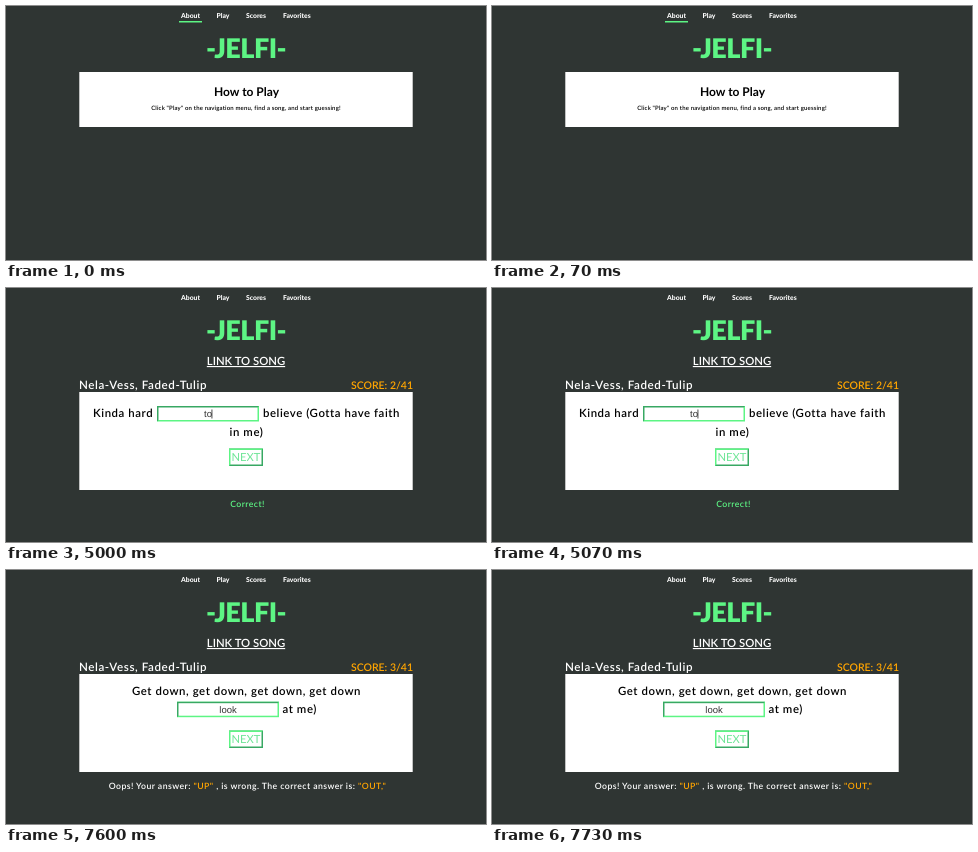
An HTML page that plays this animation: 480 px wide and 254 px high, repeating every 8 s.

```html
<!DOCTYPE html>
<html lang="en">
<head>
<meta charset="utf-8">
<title>Lyric quiz</title>
<style>
  html, body { margin: 0; width: 100%; height: 100%; overflow: hidden; background: #2f3533; }
  svg { display: block; width: 100%; height: 100%; }
  text { font-family: Lato, sans-serif; font-weight: 600; fill: #fff; white-space: pre; text-rendering: geometricPrecision; }
  .mid { text-anchor: middle; }
  .end { text-anchor: end; }
  .nav { font-size: 6.8px; font-weight: 800; }
  .logo { font-size: 27px; font-weight: 900; letter-spacing: -.02em; fill: #5df584; }
  .heading { font-size: 12px; font-weight: 700; fill: #000; }
  .small { font-size: 6px; letter-spacing: .027em; fill: #000; }
  .song { font-size: 6px; font-weight: 400; letter-spacing: .06em; fill: #333; }
  .song .link { fill: #551a8b; text-decoration: underline .4px #551a8b99; }
  .songLink { font-size: 11.3px; text-decoration: underline 1px; }
  .track { font-size: 11.6px; letter-spacing: .05em; }
  .score { font-size: 10.5px; fill: #ffa500; }
  .lyric { font-size: 11.4px; letter-spacing: .05em; fill: #000; }
  .typed { font: 9.5px "Liberation Sans", sans-serif; fill: #333; }
  .next { font-size: 11.2px; font-weight: 400; fill: #6fe597; }
  .result { font-size: 8.7px; letter-spacing: .05em; }
  .good { fill: #5df584; }
  .bad { fill: #ffa500; }
</style>
</head>
<body>
<svg viewBox="0 0 480 254"></svg>
<script>
const GREEN = '#5df584', DARK = '#38a863';

const text = (x, y, cls, content) => `<text x="${x}" y="${y}" class="${cls}">${content}</text>`;
const rect = (x, y, w, h, fill) => `<rect x="${x}" y="${y}" width="${w}" height="${h}" fill="${fill}"/>`;

// Box with a two-tone border, lit from one corner
const bevel = (x, y, w, h, topLeft, bottomRight) =>
  rect(x, y, w, h, bottomRight) +
  `<path d="M${x} ${y}h${w}l-2 2L${x + 2} ${y + h - 2}l-2 2z" fill="${topLeft}"/>` +
  rect(x + 1.5, y + 1.5, w - 3, h - 3, '#fff');

const input = (x, y, word) =>
  bevel(x, y, 102, 15.5, DARK, GREEN) + text(x + 51, y + 11, 'typed mid', word);

const header = y =>
  [[175, 'About'], [210.5, 'Play'], [240, 'Scores'], [277, 'Favorites']]
    .map(([x, label]) => text(x, y, 'nav', label)).join('') +
  text(240, y + 40.6, 'logo mid', '-JELFI-');

const card = (y, h) => rect(73.3, y, 333.4, h, '#fff');

const songs = [
  'The Orvane - Drifting Embers',
  'Nela Vess - tIdE iN uS (with cORiLa vENtOr)',
  "Isa Meru - wE'Ll DrIfT oFf",
  'Tavi Ren - Hum It',
  'Isa Meru - Paint My Shore',
  'Nela Vess - Faded Tulip',
  'Nela Vess - Salt Plums (with VELQUARTZ)',
  'Nela Vess - Marla',
  'Isa Meru - Lopsided',
  'Nela Vess - Velorintha I'
];

const about = header(11.8) + rect(173, 15, 23, 1.5, GREEN) + card(66, 55) +
  text(240.5, 90, 'heading mid', 'How to Play') +
  text(240, 103.6, 'small mid', 'Click "Play" on the navigation menu, find a song, and start guessing!');

const list = header(12.2) + rect(209, 15.5, 16, 1.5, GREEN) + card(66, 180.2) +
  songs.map((song, i) =>
    text(241.5, 89 + i * 15.33, 'song mid', `★ <tspan class="link">${song}</tspan>`)).join('');

const game = (score, question, result) => header(11.8) + card(104, 98) +
  text(240, 77, 'songLink mid', 'LINK TO SONG') +
  text(73, 101, 'track', 'Nela-Vess, Faded-Tulip') +
  text(407, 101, 'score end', `SCORE: ${score}/41`) +
  question +
  bevel(223, 160.5, 34, 17.5, GREEN, DARK) + text(240, 173, 'next mid', 'NEXT') +
  text(241.5, 219, 'result mid', result);

const right = game(2,
  text(87, 129, 'lyric', 'Kinda hard') + input(151, 118, 'to') + rect(205.6, 121.5, .7, 9, '#000') +
  text(257, 129, 'lyric', 'believe (Gotta have faith') + text(240.5, 148, 'lyric mid', 'in me)'),
  '<tspan class="good">Correct!</tspan>');

const wrong = game(3,
  text(240.5, 125, 'lyric mid', 'Get down, get down, get down, get down') +
  input(171, 131.7, 'look') + text(276.5, 143, 'lyric', 'at me)'),
  'Oops! Your answer: <tspan class="bad">"UP"</tspan> , is wrong. ' +
  'The correct answer is: <tspan class="bad">"OUT,"</tspan>');

const starts = [0, 2530, 5000, 7530];
const svg = document.querySelector('svg');
svg.innerHTML = [about, list, right, wrong].map(scene => `<g>${scene}</g>`).join('');
const scenes = [...svg.children];

function draw() {
  const time = performance.now() % 8000;
  const current = starts.findLastIndex(start => time >= start);
  scenes.forEach((scene, i) => scene.style.display = i === current ? '' : 'none');
  requestAnimationFrame(draw);
}
draw();
</script>
</body>
</html>
```
